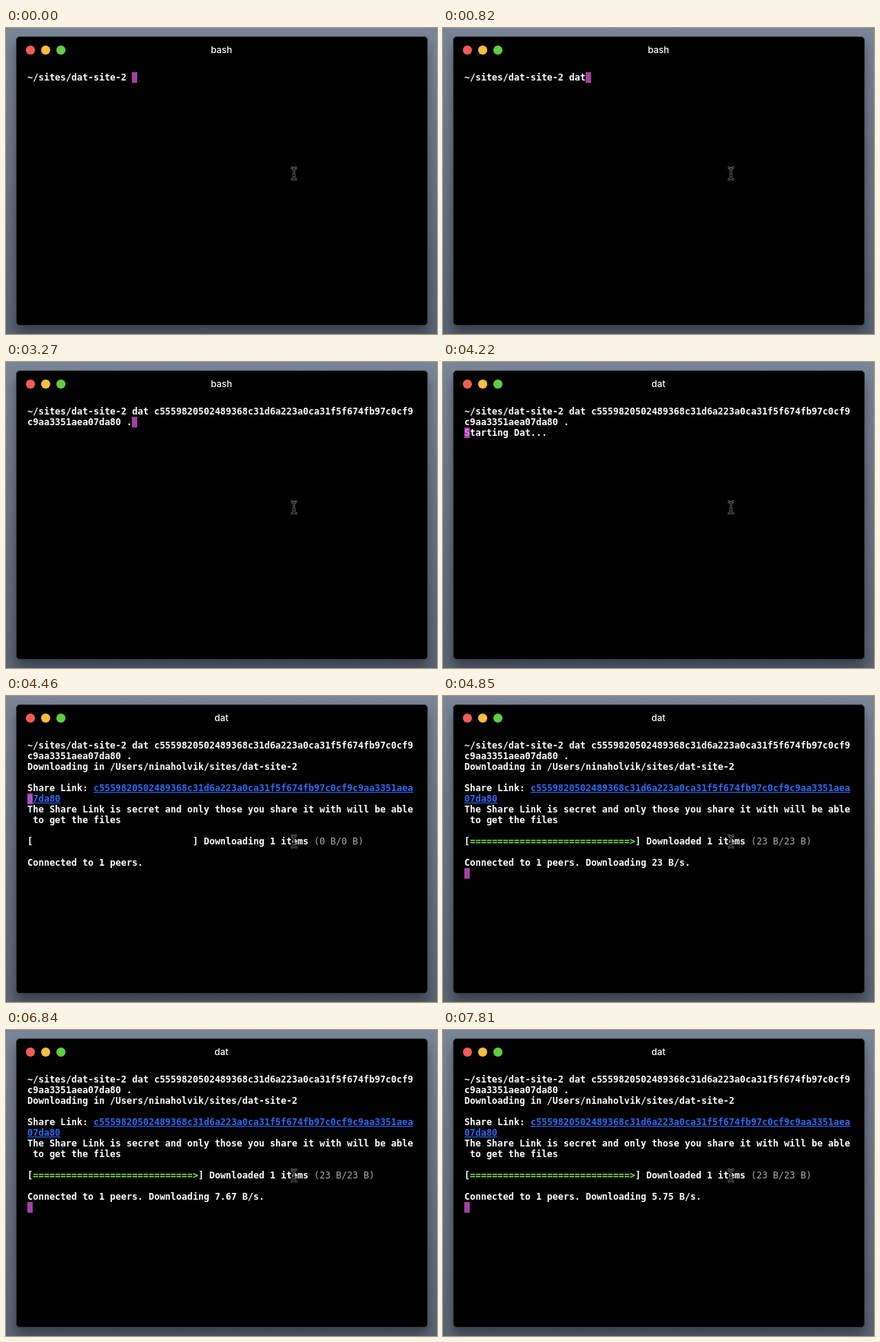
An HTML page for the animation above (8 s loop, 565 px wide and 402 px high).

```html
<!DOCTYPE html>
<html lang="en">
<head>
<meta charset="utf-8">
<style>
html, body { margin: 0; width: 100%; height: 100%; overflow: hidden; }
body { position: relative; background: linear-gradient(#798698, #667182 60%, #5b6575); }
.window {
  position: absolute; left: 13px; top: 11px; width: 540px; height: 380px; box-sizing: border-box;
  background: #000; border: 1px solid #35393f; border-radius: 5px;
  box-shadow: 0 10px 16px rgba(0, 0, 0, .38);
}
#title {
  position: absolute; left: 0; top: 21px; width: 565px; text-align: center; color: #fff;
  font: 500 12px/16px Inter, sans-serif;
}
#screen {
  position: absolute; left: 28px; top: 58px; margin: 0; color: #fff;
  font: bold 12px/14px "DejaVu Sans Mono", monospace;
}
#screen a { color: #2a6bf5; text-decoration: underline; }
#screen i { color: #7df03c; font-style: normal; }
#screen s { color: #aaa; font-weight: normal; text-decoration: none; }
#cursor { position: absolute; width: 7px; height: 14px; background: rgba(220, 85, 220, .74); }
svg { position: absolute; left: 0; top: 0; }
</style>
</head>
<body>
<div class="window"></div>
<div id="title"></div>
<pre id="screen"></pre>
<div id="cursor"></div>
<svg width="565" height="402" fill="none">
  <circle cx="32" cy="29" r="6" fill="#f25c55"/>
  <circle cx="52" cy="29" r="6" fill="#f6bd40"/>
  <circle cx="72" cy="29" r="6" fill="#60cd43"/>
  <path id="beam" d="M373.5 183.5q4 0 4 3q0-3 4-3M377.5 186.5V196q0 3-4 3M377.5 196q0 3 4 3M375.5 193.5h4" stroke="#777" stroke-width="2.8"/>
  <use href="#beam" style="display:none"/>
  <path d="M373.5 183.5q4 0 4 3q0-3 4-3M377.5 186.5V196q0 3-4 3M377.5 196q0 3 4 3M375.5 193.5h4" stroke="#000" stroke-width="1.2"/>
</svg>
<script>
const LOOP = 8000, CELL = 7.224, LINE = 14;
const $ = id => document.getElementById(id);

const prompt = '~/sites/dat-site-2 ';
const key = 'c5559820502489368c31d6a223a0ca31f5f674fb97c0cf9c9aa3351aea07da80';
const pastedRow = prompt + 'dat ' + key.slice(0, 47);
const pasted = pastedRow + '\n' + key.slice(47);
const command = pasted + ' .';

const report = (progress, speed) => `${command}
Downloading in /Users/ninaholvik/sites/dat-site-2

Share Link: <a>${key.slice(0, 58)}</a>
<a>${key.slice(58)}</a>
The Share Link is secret and only those you share it with will be able
 to get the files

${progress}

Connected to 1 peers.${speed}`;

const waiting = report('[' + ' '.repeat(29) + '] Downloading 1 items <s>(0 B/0 B)</s>', '');
const done = '[<i>' + '='.repeat(29) + '></i>] Downloaded 1 items <s>(23 B/23 B)</s>';

// [start time, text, cursor column, cursor row]; text lands just before the cursor moves
const states = [
  [0, prompt, 19, 0],
  [600, prompt + 'd', 19, 0],
  [630, prompt + 'd', 20, 0],
  [690, prompt + 'da', 20, 0],
  [720, prompt + 'da', 21, 0],
  [790, prompt + 'dat', 21, 0],
  [820, prompt + 'dat', 22, 0],
  [1060, prompt + 'dat ', 23, 0],
  [1450, pastedRow, 23, 0],
  [1480, pasted, 23, 0],
  [1510, pasted, 17, 1],
  [1990, pasted + ' ', 18, 1],
  [2160, command, 18, 1],
  [2190, command, 19, 1],
  [3360, command, 0, 2],
  [4220, command + '\nStarting Dat...', 0, 2],
  [4250, command + '\nStarting Dat...', 0, 5],
  [4460, waiting, 0, 5],
  [4520, waiting, 0, 12],
];

// 23 bytes averaged over a time that grows by a quarter second per update
[4850, 5060, 5240, 5660, 5830, 6040, 6250, 6630, 6840, 7040, 7220, 7640, 7810].forEach((time, n) => {
  const speed = +(23 / (1 + n / 4)).toFixed(2);
  states.push([time, report(done, ` Downloading ${speed} B/s.`), 0, 12]);
});

let shown;
function draw() {
  const t = performance.now() % LOOP;
  const state = states.findLast(s => s[0] <= t);
  $('title').textContent = t < 3840 ? 'bash' : 'dat';
  if (state !== shown) {
    const [, text, col, row] = shown = state;
    $('screen').innerHTML = text;
    $('cursor').style.left = Math.round(28 + col * CELL) + 'px';
    $('cursor').style.top = 58 + row * LINE + 'px';
  }
  requestAnimationFrame(draw);
}
draw();
</script>
</body>
</html>
```
